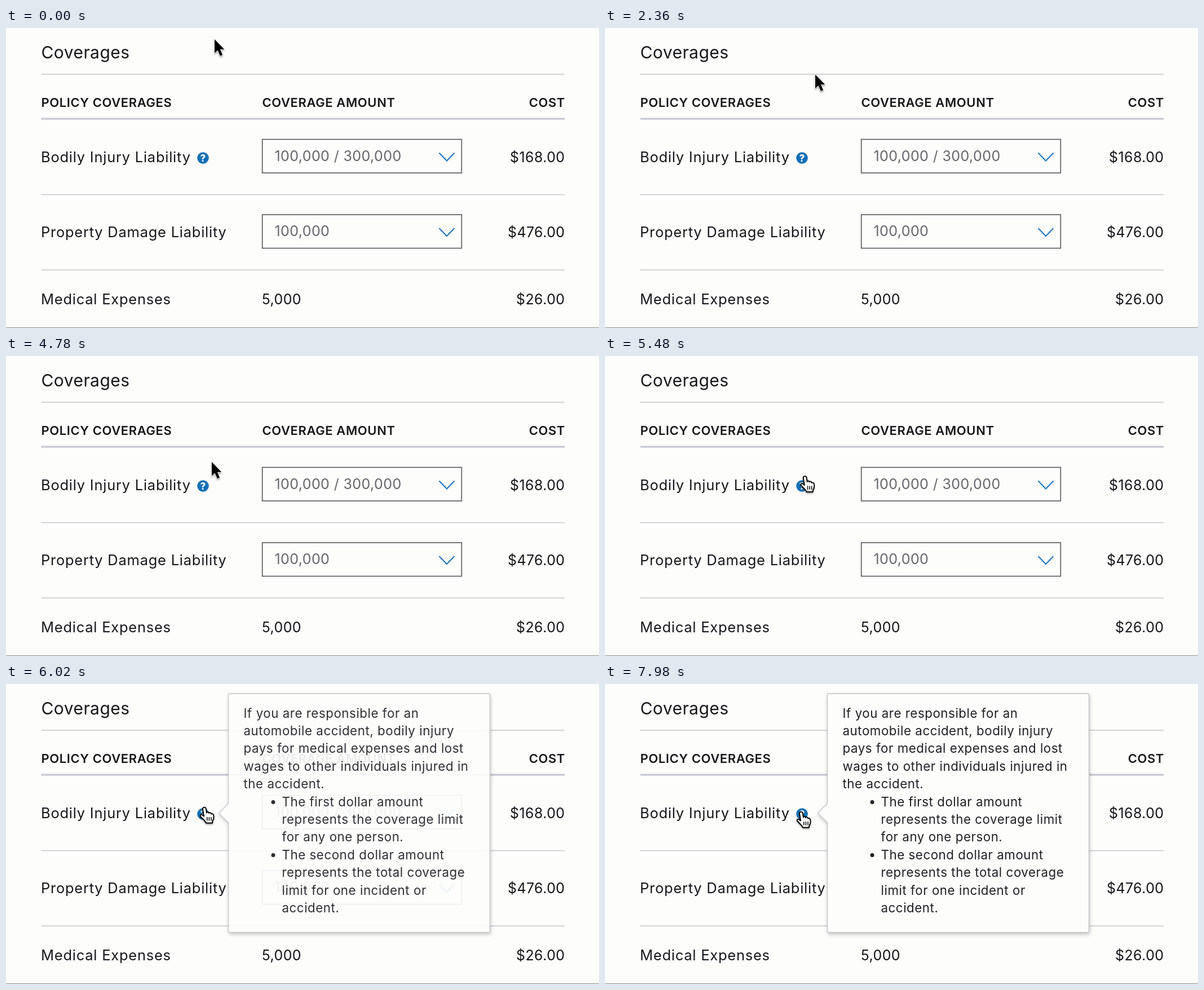
An HTML page for the animation above (8 s loop, 1052 by 532 pixels).

```html
<!DOCTYPE html>
<html lang="en">
<head>
<meta charset="utf-8">
<title>Coverages</title>
<style>
  html, body { margin: 0; width: 100%; height: 100%; overflow: hidden; background: #fdfdfc; }
  svg { display: block; width: 1052px; height: 532px; }
  text { font-family: Inter, "Open Sans", sans-serif; font-optical-sizing: none; fill: #17171b; }
  .title { font-size: 30px; letter-spacing: .45px; }
  .head { font-size: 22px; font-weight: 600; letter-spacing: .6px; }
  .label { font-size: 25.5px; letter-spacing: .75px; }
  .num { font-size: 25px; letter-spacing: .4px; }
  .value { font-size: 25px; letter-spacing: .4px; fill: #68686e; }
  .tip { font-size: 22.3px; letter-spacing: .55px; fill: #1f1f25; }
  .end { text-anchor: end; }
  .rule { stroke: #c6c6cb; stroke-width: 1.6; }
  .select rect { fill: none; stroke: #56565a; stroke-width: 1.6; }
  .select path { fill: none; stroke: #1c75c0; stroke-width: 2; }
  .box { fill: #fdfdfc; stroke: #c3c3c6; stroke-width: 1.3; }
  #popover { filter: drop-shadow(1px 3px 3px rgba(0, 0, 0, .22)); }
  #cursor { filter: drop-shadow(0 2px 1.5px rgba(0, 0, 0, .35)); }
</style>
</head>
<body>
<svg viewBox="0 0 1052 532">
  <rect width="1052" height="532" fill="#fdfdfc"/>
  <text class="title" x="62.5" y="54">Coverages</text>
  <path class="rule" d="M62.5 82H991"/>

  <text class="head" x="62.5" y="139.5">POLICY COVERAGES</text>
  <text class="head" x="454.5" y="139.5">COVERAGE AMOUNT</text>
  <text class="head end" x="992" y="139.5">COST</text>
  <path d="M62.5 161H991" stroke="#c4c4d0" stroke-width="3"/>

  <text class="label" x="62" y="237.5">Bodily Injury Liability</text>
  <circle cx="349.5" cy="230.5" r="10.3" fill="#1570b6"/>
  <text x="349.5" y="236.8" text-anchor="middle" style="font-size:17px;font-weight:800;fill:#fff">?</text>
  <g class="select">
    <rect x="454.7" y="197.5" width="353.6" height="59.5"/>
    <path d="M768.5 221.5L782 235.5L795.5 221.5"/>
    <text class="value" x="476.5" y="235.5">100,000 / 300,000</text>
  </g>
  <text class="num end" x="991.5" y="237.5">$168.00</text>
  <path class="rule" d="M62.5 295.5H991"/>

  <text class="label" x="62" y="371">Property Damage Liability</text>
  <g class="select">
    <rect x="454.7" y="331" width="353.6" height="59.5"/>
    <path d="M768.5 355L782 369L795.5 355"/>
    <text class="value" x="476.5" y="369">100,000</text>
  </g>
  <text class="num end" x="991.5" y="371">$476.00</text>
  <path class="rule" d="M62.5 429H991"/>

  <text class="label" x="62" y="490">Medical Expenses</text>
  <text class="num" x="454" y="490">5,000</text>
  <text class="num end" x="991.5" y="490">$26.00</text>
  <path d="M0 531.5H1052" stroke="#8b8b86"/>

  <g id="popover" opacity="0">
    <path class="box" d="M397 17H856q2.5 0 2.5 2.5V438q0 2.5 -2.5 2.5H397q-2.5 0 -2.5 -2.5V246L377.5 229L394.5 212V19.5q0 -2.5 2.5 -2.5Z"/>
    <circle cx="474" cy="209.5" r="3.5" fill="#1f1f25"/>
    <circle cx="474" cy="303.5" r="3.5" fill="#1f1f25"/>
  </g>

  <g id="cursor">
    <path id="arrow" d="M0 0V24.5L5.5 19.5L10 29.5L14.2 27.7L9.9 17.8H17.3Z" fill="#000" stroke="#fff" stroke-width="1.6" stroke-linejoin="round" paint-order="stroke"/>
    <g id="hand" transform="translate(-8.5 -1)" stroke="#000" stroke-width="1.9" stroke-linejoin="round" stroke-linecap="round">
      <path fill="#fff" d="M5.5 3.8C5.5 -.3 11 -.3 11.4 3.4L12.4 10.5C13 8.5 16 8.5 16.300 11C17.500 9.300 20.300 10 20.600 12.500C22 11.300 24.600 12.300 24.800 15C25.500 19 25 22 23 25L22.500 28.500H11.500C10.500 25.500 6 21.500 2 17.500C0 15.300 2 12.800 4.500 14L7.600 16.500Z"/>
      <path fill="none" stroke-width="1.5" d="M13.3 18.5V24M16.9 18.5V24M20.5 18.5V24"/>
    </g>
  </g>
</svg>
<script>
const $ = id => document.getElementById(id);
const popover = $('popover'), cursor = $('cursor'), arrow = $('arrow'), hand = $('hand');

const lines = [
  'If you are responsible for an',
  'automobile accident, bodily injury',
  'pays for medical expenses and lost',
  'wages to other individuals injured in',
  'the accident.',
  'The first dollar amount',
  'represents the coverage limit',
  'for any one person.',
  'The second dollar amount',
  'represents the total coverage',
  'limit for one incident or',
  'accident.'
];
lines.forEach((line, i) => {
  const t = document.createElementNS('http://www.w3.org/2000/svg', 'text');
  t.setAttribute('class', 'tip');
  t.setAttribute('x', i < 5 ? 421.5 : 489.5);
  t.setAttribute('y', 59.5 + i * 31.42);
  t.textContent = line;
  popover.append(t);
});

const LOOP = 8000, HOVER = 118, FADE_START = 118.7, FADE_STEPS = 12.5;

// Pointer path: step, x, y
const path = [
  [0, 370, 20], [16, 370, 20.5], [20, 370.3, 26], [26, 371, 38],
  [74, 375, 127], [90, 372, 161], [103, 365, 188], [117, 355, 213],
  [124, 353, 216], [129, 352, 219], [145, 348, 227], [172, 348, 227]
];

// Three steps per 140 ms, starting at 0, 20 and 120 ms
function stepAt(ms) {
  const phase = ms % 140;
  return 3 * Math.floor(ms / 140) + (phase < 20 ? 0 : phase < 120 ? 1 : 2);
}

function pointAt(n) {
  const i = Math.max(1, path.findIndex(p => p[0] >= n));
  const [a, x0, y0] = path[i - 1], [b, x1, y1] = path[i];
  const k = (n - a) / (b - a);
  return [x0 + (x1 - x0) * k, y0 + (y1 - y0) * k];
}

function draw(now) {
  const n = stepAt(now % LOOP);
  const k = Math.min(1, Math.max(0, (n - FADE_START) / FADE_STEPS));
  popover.setAttribute('opacity', (1 - Math.cos(Math.PI * k)) / 2);
  cursor.setAttribute('transform', `translate(${pointAt(n)})`);
  arrow.style.display = n < HOVER ? '' : 'none';
  hand.style.display = n < HOVER ? 'none' : '';
}

let start;
function tick(now) {
  start ??= now;
  draw(now - start);
  requestAnimationFrame(tick);
}
draw(0);
requestAnimationFrame(tick);
</script>
</body>
</html>
```
